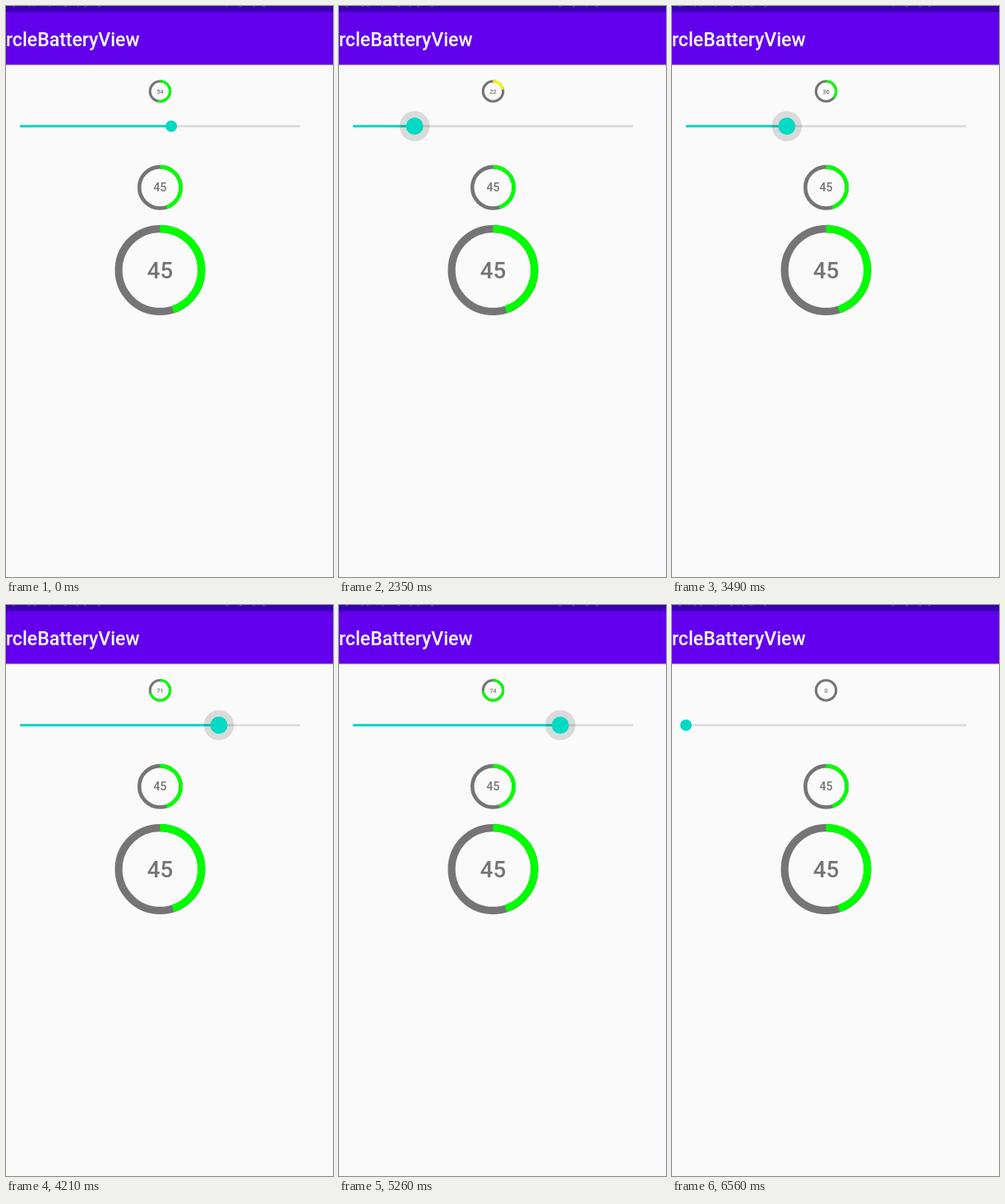
An HTML page that plays this animation: 398x696 px, repeating every 6.66 s.

```html
<!DOCTYPE html>
<html lang="en">
<head>
<meta charset="utf-8">
<title>Battery view</title>
<style>
  html, body { margin: 0; width: 100%; height: 100%; overflow: hidden; background: #fafafa; }
  svg { display: block; width: 398px; height: 696px; }
  text { font-family: Roboto, sans-serif; font-weight: 500; }
</style>
</head>
<body>
<svg id="stage" viewBox="0 0 398 696" xmlns="http://www.w3.org/2000/svg">
  <rect width="398" height="696" fill="#fafafa"/>
  <rect y="71" width="398" height="2" fill="#e9e9ec"/>
  <rect width="398" height="71.6" fill="#6200ee"/>
  <rect width="398" height="7.4" fill="#3700b3"/>
  <path d="M8 0h3M27 0h2M34 0h2M52 0h2M71 0h3M86 0h2M95 0h3M112 0h3M268 0h2M284 0h3M301 0h2M312 0h3"
        stroke="#fff" stroke-opacity=".3" stroke-width="1.4"/>
  <text x="0" y="49" font-size="23" fill="#fff">rcleBatteryView</text>
  <g id="rings"></g>
  <path d="M17 146.5H358" stroke="#d9d9d9" stroke-width="2.4"/>
  <path id="bar" stroke="#03dac5" stroke-width="2.8"/>
  <circle id="halo" cy="146.5" fill="#000"/>
  <circle id="thumb" cy="146.5" fill="#03dac5"/>
</svg>
<script>
const LOOP = 6660, PRESS = 1890, RELEASE = 6450;
const $ = id => document.getElementById(id);
const clamp = x => Math.min(1, Math.max(0, x));

// Slider drag: [time in ms, level]
const drag = [
  [1920, 54], [2352, 22], [2540, 8], [2680, 0], [2950, 0], [3492, 36],
  [4212, 71], [4590, 90], [4640, 90], [4890, 100], [5070, 100],
  [5262, 74], [5730, 57], [6170, 0]
];

function levelAt(t) {
  if (t <= drag[0][0]) return drag[0][1];
  for (let i = 1; i < drag.length; i++) {
    const [t0, a] = drag[i - 1], [t1, b] = drag[i];
    if (t < t1) return Math.round(a + (b - a) * (t - t0) / (t1 - t0));
  }
  return 0;
}

function add(tag, attrs) {
  const el = document.createElementNS('http://www.w3.org/2000/svg', tag);
  for (const k in attrs) el.setAttribute(k, attrs[k]);
  return $('rings').appendChild(el);
}

const set = (el, attrs) => {
  for (const k in attrs) el.setAttribute(k, attrs[k]);
};

const colorFor = n => n <= 15 ? '#f00' : n <= 30 ? '#ff0' : '#0f0';

function makeRing(cy, r, width, size) {
  const cx = 187.5;
  const base = { cx, cy, r, fill: 'none', 'stroke-width': width };
  add('circle', { ...base, stroke: '#757575' });
  const arc = add('circle', {
    ...base, pathLength: 100, transform: `rotate(-90 ${cx} ${cy})`
  });
  const label = add('text', {
    x: cx, y: cy + size * 0.37, 'font-size': size,
    'text-anchor': 'middle', fill: '#757575'
  });
  return n => {
    set(arc, {
      stroke: colorFor(n),
      'stroke-dasharray': n >= 100 ? 'none' : `${n} 200`,
      visibility: n > 0 ? 'visible' : 'hidden'
    });
    label.textContent = n;
  };
}

const showSmall = makeRing(104, 12.2, 3.1, 7.2);
makeRing(221.3, 25.2, 4.6, 14)(45);
makeRing(322, 50.4, 9.2, 27.8)(45);

function draw(t) {
  const n = levelAt(t);
  const x = 17 + 3.41 * n;
  const grow = clamp((t - PRESS) / 110) - clamp((t - RELEASE) / 105);
  showSmall(n);
  set($('bar'), { d: `M17 146.5H${x}` });
  set($('thumb'), { cx: x, r: 7 + 3.5 * grow });
  set($('halo'), { cx: x, r: 9 + 9.3 * grow, 'fill-opacity': 0.13 * grow });
}

const start = performance.now();
function tick() {
  draw((performance.now() - start) % LOOP);
  requestAnimationFrame(tick);
}
tick();
</script>
</body>
</html>
```
